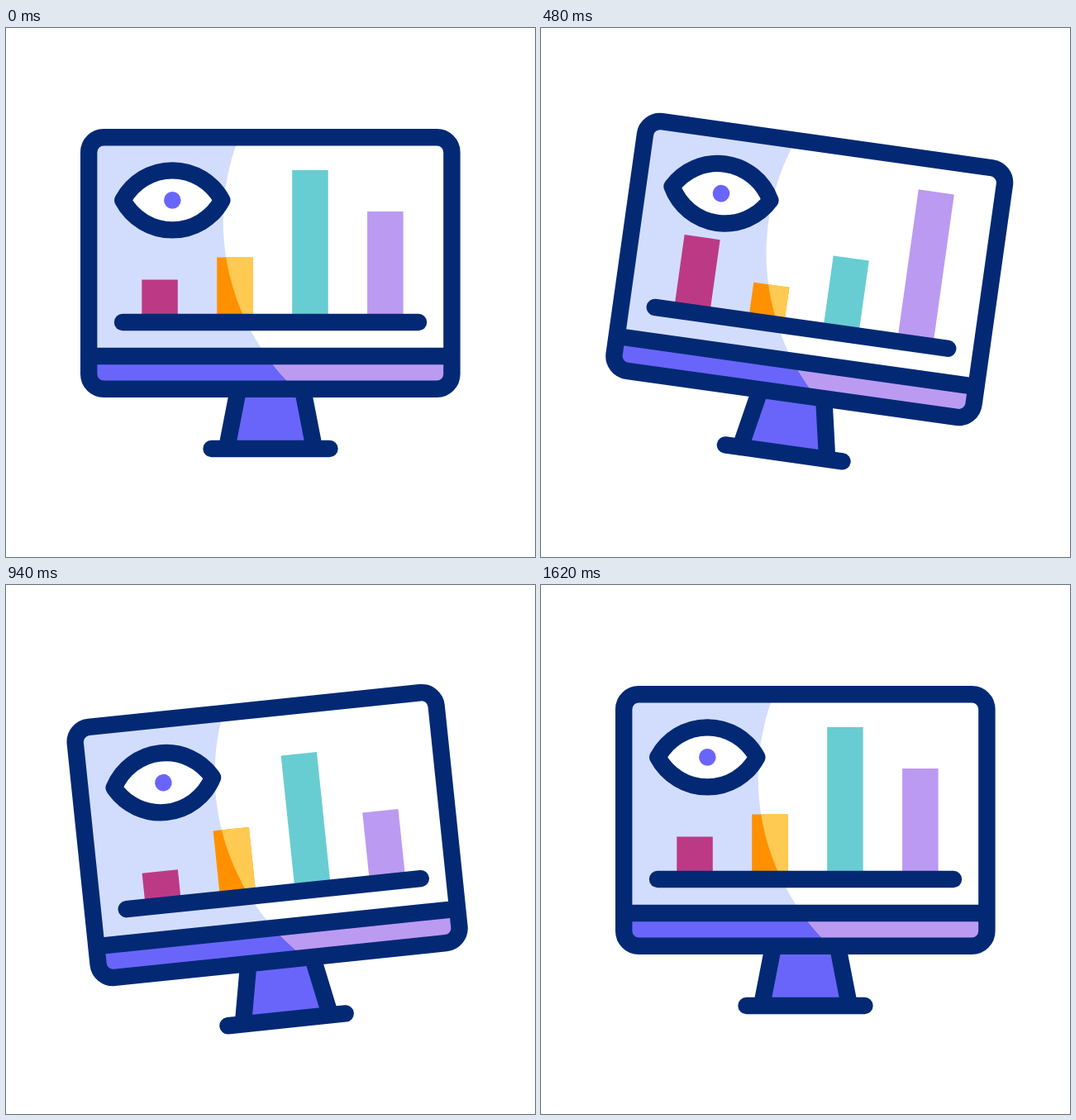
An HTML page that plays this animation: 640x640 px, repeating every 1.92 s.

```html
<!DOCTYPE html>
<html lang="en">
<head>
<meta charset="utf-8">
<title>Monitor with chart</title>
<style>
  html, body { margin: 0; width: 100%; height: 100%; overflow: hidden; background: #fff; }
  svg { display: block; width: 100vw; height: 100vh; }
  .line { fill: none; stroke: #032975; stroke-width: 20.4; stroke-linecap: round; stroke-linejoin: round; }
</style>
</head>
<body>
<svg viewBox="0 0 640 640">
  <clipPath id="lit"><circle cx="542.7" cy="233.5" r="280"/></clipPath>
  <g id="monitor">
    <path d="M281 437L267 509H373L359 437Z" fill="#6a65fa"/>
    <path class="line" d="M281 437L267 509M359 437L373 509M248.5 509H391.5"/>

    <rect x="100" y="132" width="440" height="305" rx="18" fill="#d2ddfd"/>
    <rect x="100" y="397" width="440" height="40" fill="#6a65fa"/>
    <g clip-path="url(#lit)">
      <rect x="100" y="132" width="440" height="305" rx="18" fill="#fff"/>
      <rect x="100" y="397" width="440" height="40" fill="#bb9af2"/>
    </g>
    <rect class="line" x="100.2" y="132.2" width="439.2" height="304.6" rx="18"/>
    <path class="line" d="M101 397H539"/>

    <g id="bars">
      <rect x="164.3" fill="#bc3a85"/>
      <rect x="255.2" fill="#ff9000"/>
      <rect x="255.2" fill="#ffca52" clip-path="url(#lit)"/>
      <rect x="346.2" fill="#68cdd2"/>
      <rect x="437.1" fill="#bb9af2"/>
    </g>
    <path class="line" d="M141 356H499"/>

    <g transform="translate(201.3 208.4)">
      <path id="eyeFill" fill="#fff"/>
      <circle r="10.3" fill="#6a65fa"/>
      <path id="eyeLine" class="line"/>
    </g>
  </g>
</svg>
<script>
const LOOP = 1920;
const FLOOR = 346;
const el = id => document.getElementById(id);
const bars = [...el('bars').children];

// Bar heights: resting, first swing, second swing
const orange = [68.5, 36.6, 78.4];
const heights = [[41.5, 82, 24.4], orange, orange, [174, 82, 165.4], [124, 175.6, 63]];

// Eased value along [time, value] keys
function tween(t, keys) {
  const i = keys.findIndex(key => key[0] > t);
  if (i === 0) return keys[0][1];
  if (i < 0) return keys[keys.length - 1][1];
  const [t0, a] = keys[i - 1], [t1, b] = keys[i];
  const u = (t - t0) / (t1 - t0);
  return a + (b - a) * u * u * (3 - 2 * u);
}

function eyePath(open) {
  const lid = side => {
    const y = v => (v * open * side).toFixed(2);
    return `C${-48.2 * -side} ${y(22.1)} ${25.1 * side} ${y(36)} 0 ${y(36)}` +
           `S${-48.2 * side} ${y(22.1)} ${-60 * side} 0`;
  };
  return `M60 0${lid(1)}${lid(-1)}Z`;
}

function draw() {
  const t = performance.now() % LOOP;
  const lift = tween(t, [[0, 0], [307, -26], [687, 50], [1113, 0]]);
  const tilt = tween(t, [[160, 0], [480, 8], [932, -5.95], [1300, 0]]);
  el('monitor').setAttribute('transform', `translate(0 ${lift}) rotate(${tilt} 320 320)`);

  bars.forEach((bar, i) => {
    const [rest, first, second] = heights[i];
    const h = tween(t, [[0, rest], [435, first], [600, first], [1035, second], [1190, second], [1620, rest]]);
    bar.setAttribute('y', FLOOR - h);
    bar.setAttribute('width', 43.5);
    bar.setAttribute('height', h + 6);
  });

  const open = tween(t, [[130, 1], [290, 0.06], [450, 1], [1175, 1], [1335, 0.06], [1495, 1]]);
  const d = eyePath(open);
  el('eyeFill').setAttribute('d', d);
  el('eyeLine').setAttribute('d', d);
  requestAnimationFrame(draw);
}
draw();
</script>
</body>
</html>
```
